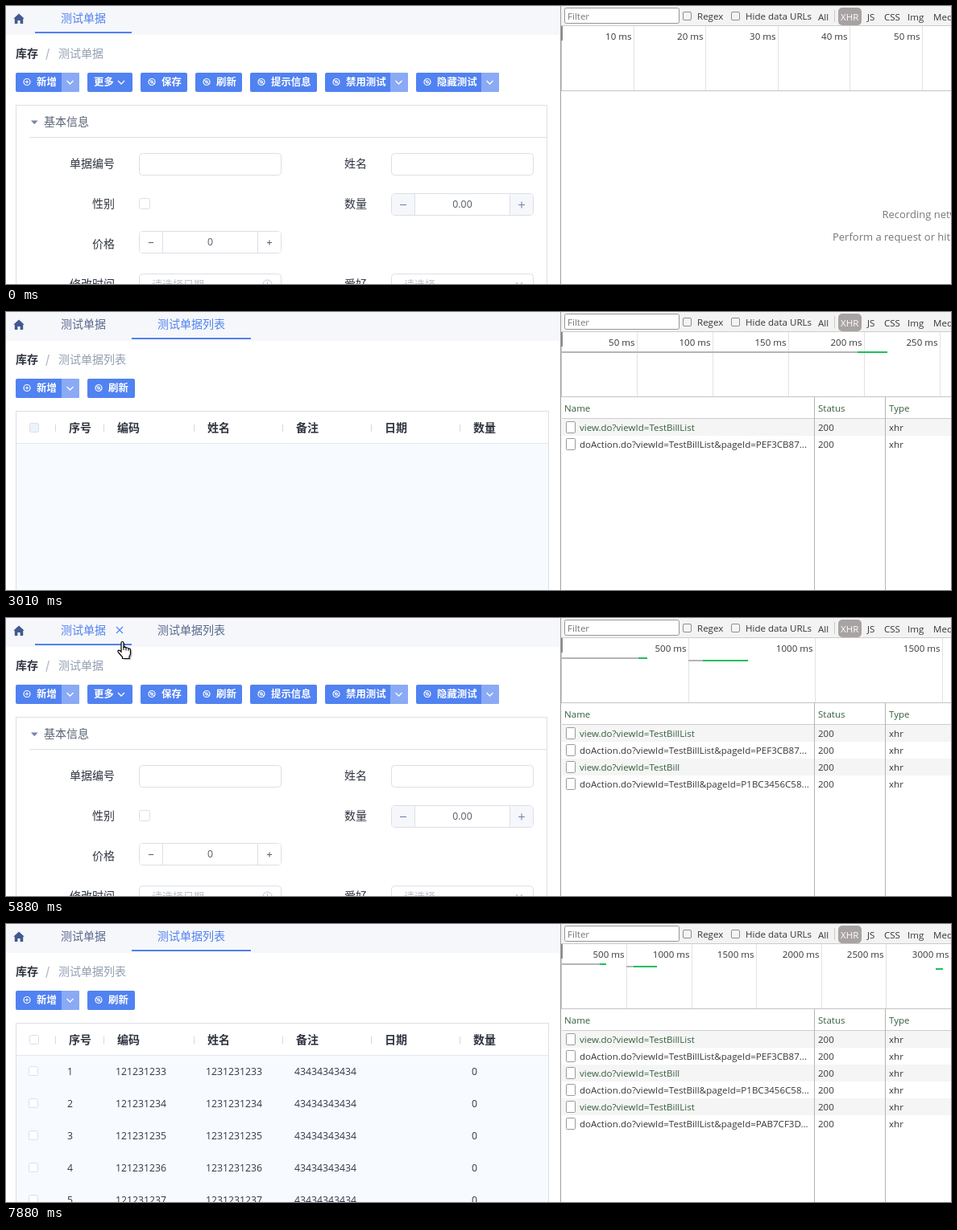
An HTML page for the animation above (8510 ms loop, 1173 by 346 pixels).

```html
<!DOCTYPE html>
<html lang="zh-CN">
<head>
<meta charset="utf-8">
<title>测试单据</title>
<style>
html, body { margin: 0; width: 100%; height: 100%; overflow: hidden; background: #fff; }
svg { display: block; width: 1173px; height: 346px; }
text { font: 14px "Noto Sans CJK SC", "Noto Sans CJK", sans-serif; white-space: pre; }
text.dev { font: 11.56px "Open Sans", sans-serif; }
text.hint { font: 13px "Open Sans", sans-serif; }
text.num { font: 12.25px "Open Sans", sans-serif; }
text.btn { font-size: 12.4px; font-weight: 700; }
text.ph { font-size: 13px; }
text.bold { font-weight: 700; }
.end { text-anchor: end; }
.mid { text-anchor: middle; }
</style>
</head>
<body>
<svg id="stage" viewBox="0 0 1173 346" xmlns="http://www.w3.org/2000/svg"></svg>
<script>
const LOOP = 8510;
const BLUE = '#5182f1', LIGHT = '#8aaaf6', BORDER = '#dcdfe6', INK = '#303540', TAB = '#5a688e';
const GREEN = '#35603d', GREY = '#363636';

const rect = (x, y, w, h, fill, extra = '') =>
  `<rect x="${x}" y="${y}" width="${w}" height="${h}" fill="${fill}" ${extra}/>`;
const box = (x, y, w, h, r = 2, fill = '#fff', stroke = BORDER) =>
  rect(x + .5, y + .5, w - 1, h - 1, fill, `rx="${r}" stroke="${stroke}"`);
const line = (d, stroke, width = 1) =>
  `<path d="${d}" fill="none" stroke="${stroke}" stroke-width="${width}"/>`;
const text = (x, y, s, fill = INK, cls = '') =>
  `<text x="${x}" y="${y}" fill="${fill}" class="${cls}">${s.replace(/&/g, '&amp;')}</text>`;
const during = (spans, body) => `<g data-on="${spans}">${body}</g>`;
const chevron = (x, y, stroke) => line(`M${x - 4} ${y - 2}l4 4 4-4`, stroke, 1.3);
const minus = (x, y, stroke, r = 4) => line(`M${x - r} ${y}h${2 * r}`, stroke, 1.1);
const plus = (x, y, stroke, r = 4) => line(`M${x - r} ${y}h${2 * r}M${x} ${y - r}v${2 * r}`, stroke, 1.1);

// ---- left: application ----
function button(x, w, label, icon, split) {
  let out = rect(x, 83, w, 24, BLUE, 'rx="2"');
  if (split) {
    out += `<path d="M${x + w - 22} 83h20q2 0 2 2v20q0 2-2 2h-20z" fill="${LIGHT}"/>` +
      chevron(x + w - 11.5, 95, '#fff');
  }
  if (icon) {
    out += `<circle cx="${x + 14}" cy="94.5" r="4" fill="none" stroke="#fff" stroke-width="1.2"/>`;
    out += icon === 'add' ? plus(x + 14, 94.5, '#fff', 2)
      : `<circle cx="${x + 14}" cy="94.5" r="1.6" fill="none" stroke="#fff"/>` +
        line(`M${x + 11} 92l6 5`, '#fff');
  }
  return out + text(x + (icon ? 26 : 8), 99, label, '#fff', 'btn');
}

function form() {
  const label = (x, y, s) => text(x, y, s, INK, 'end');
  const stepper = (y, x, value, side, sign, r) =>
    box(x, y, 177, 28, 4) +
    rect(x + 1, y + 1, 28, 26, side, 'rx="3"') + rect(x + 148, y + 1, 28, 26, side, 'rx="3"') +
    line(`M${x + 29.5} ${y}v28M${x + 147.5} ${y}v28`, BORDER) +
    minus(x + 15, y + 14.5, sign, r) + plus(x + 162, y + 14.5, sign, r) +
    text(x + 88.5, y + 18, value, '#555b66', 'num mid');
  return button(12, 79, '新增', 'add', true) + button(101, 56, '更多') + chevron(143, 95, '#fff') +
    button(167, 58, '保存', 'dot') + button(235, 58, '刷新', 'dot') + button(303, 83, '提示信息', 'dot') +
    button(396, 103, '禁用测试', 'dot', true) + button(509, 103, '隐藏测试', 'dot', true) +
    box(12, 123, 660, 240, 0) + line('M29 163.5H671', BORDER) +
    '<path d="M31 142.5h8.5l-4.2 4.8z" fill="#7584a8"/>' + text(47, 149, '基本信息', '#596274') +
    label(135, 201, '单据编号') + box(165, 183, 177, 28, 4) +
    label(448, 201, '姓名') + box(478, 183, 177, 28, 4) +
    label(135, 251, '性别') + box(165, 239, 14, 14) +
    label(448, 251, '数量') + stepper(233, 478, '0.00', '#f5f7fa', '#7184ad', 4) +
    label(135, 301, '价格') + stepper(280, 165, '0', '#fff', '#606266', 3) +
    label(135, 351, '修改时间') + box(165, 333, 177, 28, 4) + text(181, 351, '请选择日期', '#bcc0c8', 'ph') +
    '<circle cx="324.5" cy="346.5" r="5.5" fill="none" stroke="#c0c4cc"/>' + line('M324.5 343v4h3', '#c0c4cc') +
    label(448, 351, '爱好') + box(478, 333, 177, 28, 4) + text(494, 351, '请选择', '#bcc0c8', 'ph') +
    chevron(637, 346, '#c0c4cc');
}

function list() {
  const heads = [[78, '序号'], [138, '编码'], [250, '姓名'], [360, '备注'], [470, '日期'], [580, '数量']];
  return button(12, 79, '新增', 'add', true) + button(101, 59, '刷新', 'dot') +
    box(12, 123, 662, 240, 0) + rect(13, 164, 660, 182, '#f7fbff') + line('M13 163.5H673', '#e4e7ed') +
    box(29, 138, 12, 12) +
    heads.map(([x, s]) => line(`M${x - 16.5} 140v9`, '#d5d8e0') + text(x, 149, s, INK, 'bold')).join('');
}

function listRows() {
  let out = '';
  for (let i = 0; i < 5; i++) {
    const y = 188 + 40 * i;
    const cells = [[76, 1 + i], [136, 121231233 + i], [248, 1231231233 + i], [358, 43434343434], [578, 0]];
    out += box(28, y - 11, 12, 12) + cells.map(([x, v]) => text(x, y, String(v), '#323847', 'num')).join('');
  }
  return out;
}

function tab(x, w, label, activeSpans, idleSpans, hoverId) {
  const face = color => text(x + 32, 20, label, color) +
    `<g class="${hoverId}">${line(`M${x + w - 19} 11l8 8m0-8l-8 8`, color, 1.1)}</g>`;
  return during(idleSpans, face(TAB)) +
    during(activeSpans, face(BLUE) + rect(x, 32, w, 2, BLUE) + text(65, 64, label, '#929fb0'));
}

const app = rect(0, 0, 688, 36, '#f5f7fa') +
  '<path d="M16 9.5l6.8 6.2h-1.6V22h-3.6v-4h-3.2v4h-3.6v-6.3H9.2z" fill="#42598f"/>' +
  tab(36, 120, '测试单据', '0-2230 5160-6800', '2230-5160 6800-8510', 'hover1') +
  tab(156, 148, '测试单据列表', '2230-5160 6800-8510', '5160-6800', 'hover2') +
  text(12, 64, '库存', INK, 'bold') + text(49, 64, '/', '#b4bac6', 'bold') +
  during('0-2230 5560-6800', form()) +
  during('2780-5160 7030-8510', list()) +
  during('2780-3090 7030-7410', box(29, 138, 12, 12, 2, '#edf2fc')) +
  during('3090-5160 7410-8510', listRows());

// ---- right: network panel ----
function toolbar() {
  const dev = (x, y, s, fill = GREY) => text(x, y, s, fill, 'dev');
  const check = x => box(x, 7, 11, 11, 1.5, '#f4f4f4', '#8f8f8f');
  const filters = [[1008, 'All'], [1069, 'JS'], [1090, 'CSS'], [1119, 'Img'], [1151, 'Media']];
  return rect(689, 0, 484, 24, '#f3f3f3') + line('M689 24.5H1173', '#ccc') +
    box(693, 2, 143, 20, 2, '#fff', '#979797') + dev(697, 17, 'Filter', '#777') +
    check(840) + dev(858, 17, 'Regex') + check(900) + dev(918, 17, 'Hide data URLs') +
    line('M1028.5 5v15', '#ccc') + rect(1033, 2, 29, 22, '#a8a3a2', 'rx="5"') + dev(1036, 18, 'XHR', '#fff') +
    filters.map(([x, s]) => dev(x, 18, s)).join('');
}

// tick: ms per division, step: its width, bars: [grey start, green start, end, y]
function overview(spans, tick, step, bars) {
  let out = '';
  for (let i = 1; 690 + step * (i - 1) < 1173; i++) {
    const x = Math.floor(690 + step * i);
    out += line(`M${x - .5} 25v80`, '#e2e2e2').replace(`M${x - .5}`, `M${x + .5}`) +
      text(x - 2.5, 42, `${tick * i} ms`, GREY, 'dev end');
  }
  for (const [a, b, c, y] of bars) {
    out += rect(a, y - 1, b - a, 2, '#b5b5b5') + rect(b, y - 1, c - b, 2, '#1dbf5b');
  }
  return during(spans, out);
}

function requests() {
  const list1 = 'view.do?viewId=TestBillList';
  const rows = [
    [list1, 2310, 2630],
    ['doAction.do?viewId=TestBillList&pageId=PEF3CB87...', 2930, 3010],
    ['view.do?viewId=TestBill', 5160, 5160],
    ['doAction.do?viewId=TestBill&pageId=P1BC3456C58...', 5640, 5720],
    [list1, 6800, 6800],
    ['doAction.do?viewId=TestBillList&pageId=PAB7CF3D...', 7180, 7410]
  ];
  return rows.map(([name, start, done], i) => {
    const y = 133 + 21 * i, base = y + 15;
    return during(`${start}-${LOOP}`,
      (i % 2 ? '' : rect(690, y, 483, 21, '#f5f5f5')) + box(695, y + 3, 12, 15, 1, '#fff', '#9a9a9a') +
      text(712, base, name, i % 2 ? GREY : GREEN, 'dev') + text(1096, base, 'xhr', GREY, 'dev')) +
      during(`${start}-${done}`, text(1008, base, '(pending)', '#888', 'dev')) +
      during(`${done}-${LOOP}`, text(1008, base, '200', GREY, 'dev'));
  }).join('');
}

const network = rect(689, 0, 484, 346, '#fff') + toolbar() +
  overview('0-2630', 10, 89.4, []) +
  overview('2630-3090', 50, 93.8, [[690, 1057, 1094, 50]]) +
  overview('3090-5160', 100, 119.95, [[690, 1056, 1094, 50]]) +
  overview('5160-6800', 500, 157.4, [[690, 785, 796, 50], [847, 865, 921, 53]]) +
  overview('6800-7410', 500, 100.7, [[690, 750, 758, 50], [790, 800, 838, 53]]) +
  overview('7410-8510', 500, 80.5, [[690, 737, 745, 50], [770, 779, 808, 53], [1154, 1154, 1163, 56]]) +
  line('M689 105.5H1173', '#c4c4c4') +
  during('0-2310', text(1087.5, 264, 'Recording network activity…', '#777', 'hint') +
    text(1026, 291.5, 'Perform a request or hit', '#777', 'hint')) +
  during(`2310-${LOOP}`, requests() + line('M690 132.5H1173', '#cdcdcd') +
    line('M1003.5 106V346M1091.5 106V346', '#b4b4b4') +
    text(693, 124, 'Name', GREEN, 'dev') + text(1008, 124, 'Status', GREEN, 'dev') +
    text(1096, 124, 'Type', GREEN, 'dev')) +
  line('M688.5 0V346', '#a0a0a0') + line('M689.5 25v80', '#c8c8c8') + rect(689, 25, 2, 18, '#8a8a8a');

// ---- pointer ----
const handShape = 'M5 2Q5 .5 6.5 .5T8 2V7.5Q9.5 6.3 11 8Q12.7 7.2 14 9Q16.5 8.5 16.5 11V15Q16.5 17 15 19V21.5H6.5V19.5L2 14.5Q0 12 1.5 11.2Q3 10.8 5 13Z';
const pointer =
  '<g id="arrow"><path d="M.5 .5V16.5L4.2 13L6.8 18.5L9.2 17.5L6.8 12H11.8Z" fill="#fff" stroke="#000"/></g>' +
  `<g id="hand"><path d="${handShape}" opacity=".25" transform="translate(2 1.5)"/>` +
  `<path d="${handShape}" fill="#fff" stroke="#000" stroke-width="1.2"/>` +
  line('M8 7.5V11M11 8V11.5M14 9V12', '#000') + '</g>';

// [time, shape, x, y], held until the next entry
const moves = [
  [0], [290, 'arrow', 586, 304], [370, 'arrow', 330, 262], [450, 'arrow', 2, 188], [520],
  [3470, 'arrow', 52, 61], [3550, 'arrow', 66, 46], [3630, 'hand', 86, 33], [3710, 'hand', 107, 28],
  [3780, 'hand', 118, 26], [3860, 'hand', 121, 26], [4090, 'hand', 121, 22],
  [4390, 'hand', 100, 32], [4470, 'arrow', 74, 42], [4550, 'arrow', 54, 43], [4620, 'arrow', 62, 38],
  [4700, 'hand', 78, 28], [4780, 'hand', 93, 20],
  [5790, 'hand', 108, 24], [5870, 'hand', 138, 29], [5950, 'hand', 170, 27], [6020, 'hand', 197, 22],
  [6100, 'hand', 210, 18], [6170, 'hand', 215, 17],
  [7570, 'arrow', 224, 60], [7650, 'arrow', 250, 140], [7720, 'arrow', 290, 230], [7800, 'arrow', 330, 322], [7880]
];

const stage = document.getElementById('stage');
stage.innerHTML = app + network + pointer;

const timed = [...stage.querySelectorAll('[data-on]')].map(el => ({
  el, spans: el.dataset.on.split(' ').map(s => s.split('-').map(Number))
}));
const show = (el, on) => el.setAttribute('display', on ? 'inline' : 'none');

function render(t) {
  for (const { el, spans } of timed) show(el, spans.some(([a, b]) => t >= a && t < b));
  const [, shape, x, y] = moves.findLast(m => m[0] <= t);
  for (const id of ['arrow', 'hand']) {
    const el = document.getElementById(id);
    show(el, id === shape);
    if (id === shape) el.setAttribute('transform', `translate(${x} ${y})`);
  }
  const hovered = shape !== 'hand' ? '' : x + 6 < 156 ? 'hover1' : 'hover2';
  for (const id of ['hover1', 'hover2']) {
    stage.querySelectorAll('.' + id).forEach(el => show(el, id === hovered));
  }
}

const began = performance.now();
function frame() {
  render((performance.now() - began) % LOOP);
  requestAnimationFrame(frame);
}
frame();
</script>
</body>
</html>
```
